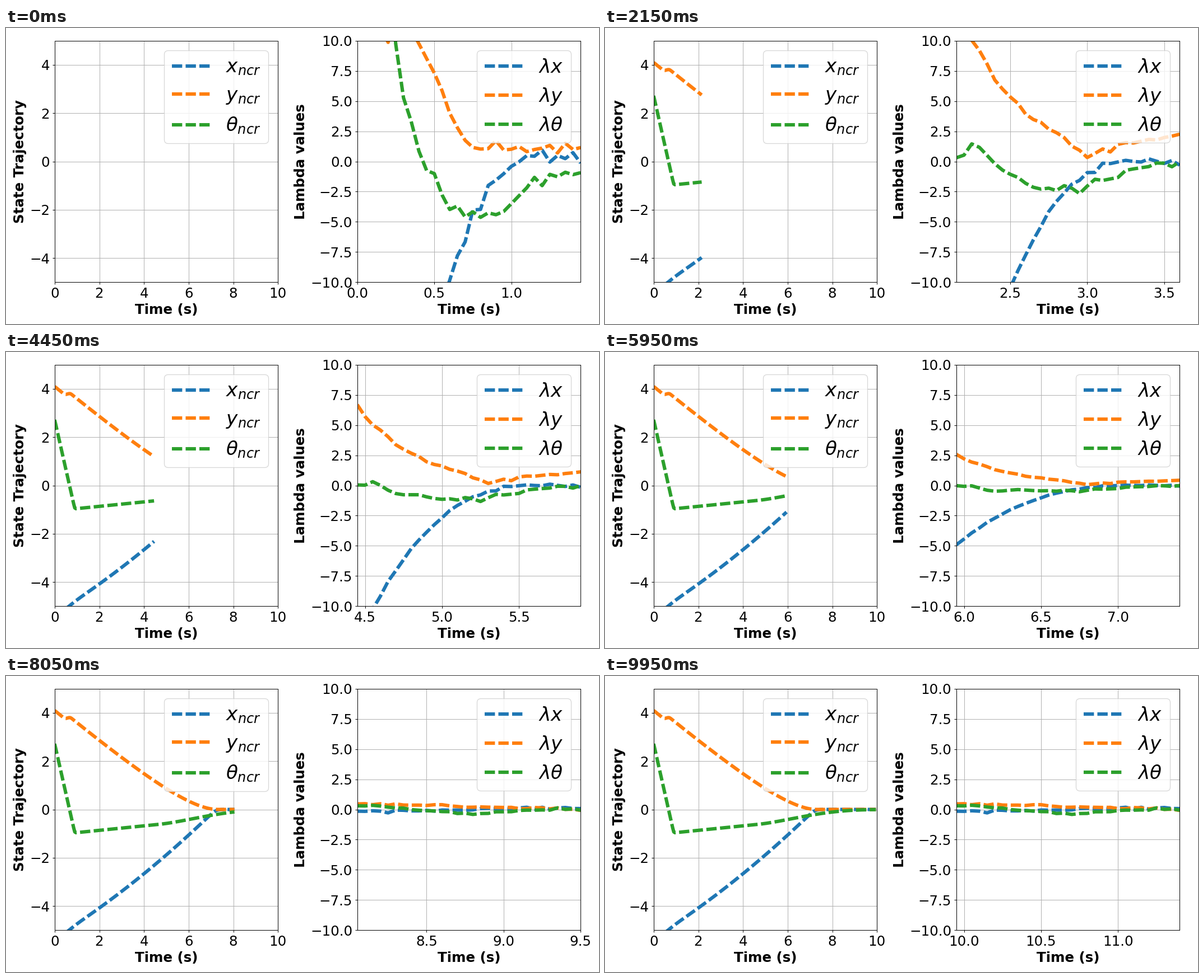
Recreate the animation shown at these times as a matplotlib script. Size 1058 px wide and 529 px high, loop 10000 ms.

```python
import numpy as np
import matplotlib.pyplot as plt
from matplotlib.animation import FuncAnimation
from matplotlib.ticker import FormatStrFormatter, MultipleLocator

# 12 x 6 inches at this dpi is 1058 x 529 pixels
DPI = 88.16667
DT, FRAMES, HORIZON = 0.05, 200, 30
COLORS = ["tab:blue", "tab:orange", "tab:green"]
DASH = dict(linewidth=5, linestyle=(0, (3, 1)))


def smooth(t, start, end):
    u = np.clip((t - start) / (end - start), 0, 1)
    return u * u * (3 - 2 * u)


def bump(s, center, left, right=None):
    width = np.where(s < center, left, right or left)
    return np.exp(-((s - center) / width) ** 2)


def soft_max(a, b, width):
    return width * np.logaddexp(a / width, b / width)


# The robot first turns on the spot, then drives to the goal
time = np.arange(FRAMES) * DT
left_to_go = np.clip(7.3 - time, 0, None)
x = -5.32 + 0.575 * time + 0.0225 * time ** 2 - 0.14 * np.exp(-(time / 0.7) ** 2)
y = (0.81 * left_to_go ** 2 / (left_to_go + 2.65)
     - 0.24 * (1 - smooth(time, 0.4, 0.75)))
heading = (-1.05 + 0.0925 * time) * (1 - 0.95 * smooth(time, 4.6, 10))
states = [-soft_max(-x, 0, 0.08), y, soft_max(2.72 - 4.09 * time, heading, 0.05)]

# Lambda profiles over the horizon for turning, driving and resting
step = np.arange(HORIZON)
rng = np.random.default_rng(4)


def noise(size):
    return size * rng.normal(size=(3, HORIZON))


def approach(size, end, power):
    return -size * np.clip(1 - step / end, 0, 1) ** power


turn = noise(0.3) + [
    approach(52, 22, 2.1) + 0.5 * smooth(step, 18, 24),
    1.1 + 12 * (1 - smooth(step, 4, 16)) - 3.6 * bump(step, 3.7, 1),
    119 * np.exp(-step / 2) - 4.6 * bump(step, 14, 5, 10),
]
drive = noise(0.18) + [
    approach(25.5, 23, 2.4),
    13.1 * np.exp(-step / 7.5) - 0.6 * bump(step, 17.5, 3) + 1.9 * smooth(step, 16, 30),
    1.6 * bump(step, 2.6, 1.8) - 2.4 * bump(step, 12.5, 6, 10),
]
rest = noise(0.05) + [
    -0.15 * np.cos(np.pi * step / HORIZON),
    0.45 * (1 - step / HORIZON),
    0.3 * bump(step, 1.5, 4) - 0.38 * bump(step, 15, 5.5),
]


def lambdas(t):
    turned = smooth(t, 0, 0.95)
    effort = np.clip((7 - t) / 4.85, 0, None) ** 1.08
    rows = (1 - turned) * turn + turned * effort * drive + smooth(t, 5.8, 7.2) * rest
    rows[2] -= 0.75 * bump(t, 5, 1.5) * bump(step, 4, 3)
    return rows


fig, (ax1, ax2) = plt.subplots(1, 2, figsize=(12, 6), dpi=DPI, facecolor="white")


def setup(ax, ylabel, limit, labels):
    ax.set_ylim(-limit, limit)
    ax.grid(True)
    ax.tick_params(labelsize=20)
    ax.set_xlabel("Time (s)", fontsize=20, fontweight="bold")
    ax.set_ylabel(ylabel, fontsize=20, fontweight="bold")
    lines = [ax.plot([], [], color=c, label=s, **DASH)[0]
             for c, s in zip(COLORS, labels)]
    ax.legend(loc="upper right", fontsize=28)
    return lines


state_lines = setup(ax1, "State Trajectory", 5,
                    [r"$x_{ncr}$", r"$y_{ncr}$", r"$\theta_{ncr}$"])
ax1.set_xlim(0, 10)
ax1.xaxis.set_major_locator(MultipleLocator(2))
ax1.yaxis.set_major_locator(MultipleLocator(2))

lambda_lines = setup(ax2, "Lambda values", 10,
                     [r"$\lambda x$", r"$\lambda y$", r"$\lambda\theta$"])
ax2.set_xlim(0, 1)
ax2.yaxis.set_major_locator(MultipleLocator(2.5))
ax2.xaxis.set_major_locator(MultipleLocator(0.5))
ax2.xaxis.set_major_formatter(FormatStrFormatter("%.1f"))
fig.tight_layout()


def update(k):
    t = time[k]
    for line, values in zip(state_lines, states):
        line.set_data(time[:k + 1], values[:k + 1])
    ahead = t + step * DT
    for line, values in zip(lambda_lines, lambdas(t)):
        line.set_data(ahead, values)
    ax2.set_xlim(round(ahead[0], 2), round(ahead[-1], 2))
    return state_lines + lambda_lines


anim = FuncAnimation(fig, update, frames=FRAMES, interval=50, repeat=True,
                     repeat_delay=0, blit=False)
plt.show()
```
